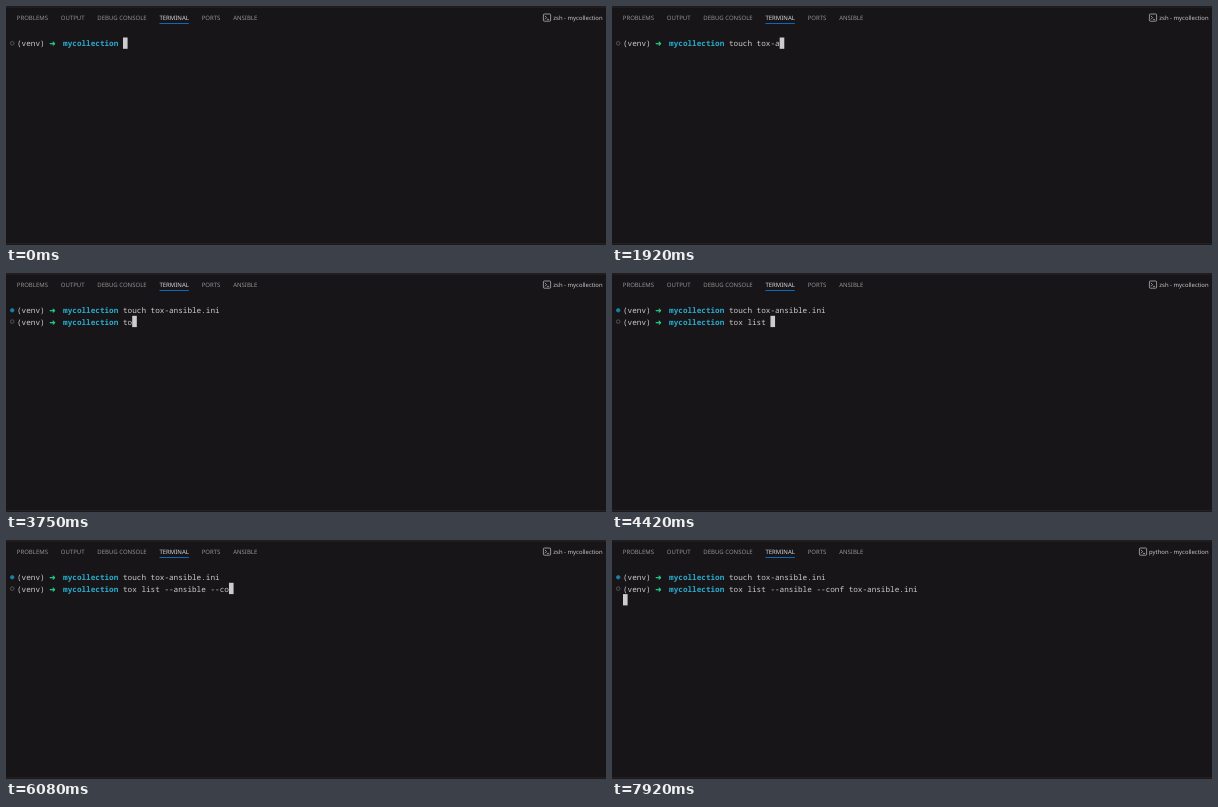
These frames come from a looping animation (600 by 239 pixels, 8 s). An HTML page:

```html
<!DOCTYPE html>
<html lang="en">
<head>
<meta charset="utf-8">
<title>Terminal session</title>
<style>
  html, body { margin: 0; width: 100%; height: 100%; overflow: hidden; background: #181518; }
  svg { display: block; width: 100%; height: 100%; }
  text { white-space: pre; text-rendering: geometricPrecision; }
  .ui { font: 6px "Noto Sans", "Open Sans", sans-serif; fill: #929292; }
  .ui.on { fill: #d8d8d8; }
  .ui.title { font-size: 5.92px; fill: #c8c8c8; }
  .mono { font: 7.68px "Noto Sans Mono", "DejaVu Sans Mono", monospace; fill: #cccccc; }
  .dir { font-weight: 700; fill: #29abcd; }
  .arrow { font: 7.68px "DejaVu Sans", sans-serif; fill: #23d18b; stroke: #23d18b; stroke-width: .2; }
</style>
</head>
<body>
<svg id="stage" viewBox="0 0 600 239" preserveAspectRatio="none">
  <rect width="600" height="239" fill="#181518"/>
  <rect y="0.6" width="600" height="0.8" fill="#2b292b"/>
  <rect y="237.4" width="600" height="0.8" fill="#2b292b"/>
</svg>
<script>
const LOOP = 8000, FRAME = 1000 / 12, KEY = 54;
const LEFT = 11, TOP = 31.5, CELL = 4.608, ROW = 11.3, PROMPT = 23;
const stage = document.getElementById('stage');

function add(tag, attrs, text = '', parent = stage) {
  const node = document.createElementNS('http://www.w3.org/2000/svg', tag);
  for (const key in attrs) node.setAttribute(key, attrs[key]);
  node.textContent = text;
  parent.appendChild(node);
  return node;
}

const colX = col => LEFT + col * CELL;
const rowY = row => TOP + row * ROW;

// Panel tabs, laid out from left to right
let tabX = 10.8;
for (const name of ['PROBLEMS', 'OUTPUT', 'DEBUG CONSOLE', 'TERMINAL', 'PORTS', 'ANSIBLE']) {
  const active = name === 'TERMINAL';
  const tab = add('text', { x: tabX, y: 13.9, class: active ? 'ui on' : 'ui' }, name);
  const width = tab.getComputedTextLength();
  if (active) add('rect', { x: tabX, y: 17, width, height: 1, fill: '#0a69b8' });
  tabX += width + 12.8;
}

// Shell name and its icon
const icon = add('g', { fill: 'none', stroke: '#c8c8c8', 'stroke-width': 0.7 });
add('rect', { x: 0.4, y: 8, width: 7.2, height: 7.2, rx: 0.9 }, '', icon);
add('path', { d: 'M1.9 9.9l1.7 1.7l-1.7 1.7M4.1 13.4h2' }, '', icon);
const title = add('text', { x: 596.6, y: 13.8, class: 'ui title', 'text-anchor': 'end' });

// Prompt lines
const lines = [0, 1].map(row => {
  const group = add('g', {});
  const y = rowY(row) + 8.7;
  const put = (col, cls, text) => add('text', { x: colX(col), y, class: cls }, text, group);
  put(0, 'mono', '(venv)');
  put(7, 'arrow', '➜');
  put(10, 'mono dir', 'mycollection');
  const dot = add('circle', { cx: 6.2, cy: rowY(row) + 5.8, r: 1.8, 'stroke-width': 0.7 }, '', group);
  return { group, dot, input: put(PROMPT, 'mono', '') };
});
const cursor = add('rect', { width: CELL, height: ROW, fill: '#cccccc' });

// A burst of keys at an even pace; a gap of 0 inserts the text at once
const burst = (start, text, gap = KEY) => t => {
  if (t < start) return '';
  return gap ? text.slice(0, 1 + Math.floor((t - start) / gap)) : text;
};
const commands = [
  [burst(200, 'touch'), burst(1030, ' t'), burst(1580, 'ox-'),
   burst(1910, 'ansible.'), burst(2500, 'ini')],
  [burst(3410, 't'), burst(3750, 'ox'), burst(4020, ' l'), burst(4250, 'ist '),
   burst(4580, '-'), burst(4750, '-ans'), burst(5002, 'ible'), burst(5270, ' -'),
   burst(5580, '-'), burst(5750, 'c'), burst(6050, 'onf'), burst(6580, ' t'),
   burst(6830, 'ox'), burst(7000, '-ansible.ini ', 0)]
];
const ENTER = [2750, 7500], READY = 2900, RUNNING = 7740;

function render(time) {
  const t = Math.floor((time + 5) / FRAME) * FRAME;
  const ready = t >= READY, busy = t >= RUNNING;
  const inputs = commands.map(parts => parts.map(part => part(t)).join(''));

  lines.forEach(({ dot, input }, i) => {
    const done = i === 0 && ready;
    input.textContent = inputs[i];
    dot.setAttribute('fill', done ? '#1b81a8' : 'none');
    dot.setAttribute('stroke', done ? '#1b81a8' : '#6a6a6a');
  });
  lines[1].group.setAttribute('visibility', ready ? 'visible' : 'hidden');

  const row = ENTER.filter(at => t >= at).length;
  const atPrompt = row === 0 || (row === 1 && ready);
  cursor.setAttribute('x', colX(atPrompt ? PROMPT + inputs[row].length : 0));
  cursor.setAttribute('y', rowY(row));

  title.textContent = (busy ? 'python' : 'zsh') + ' - mycollection';
  icon.setAttribute('transform', `translate(${busy ? 527 : 537} 0)`);
}

const start = performance.now();
function tick() {
  render((performance.now() - start) % LOOP);
  requestAnimationFrame(tick);
}
render(0);
requestAnimationFrame(tick);
</script>
</body>
</html>
```
